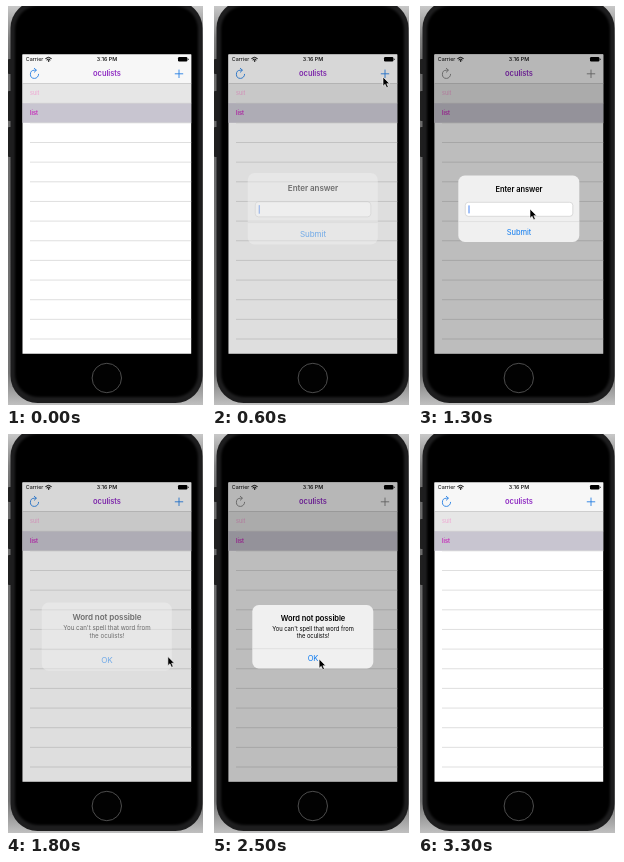
An HTML page that plays this animation: 200 px wide and 400 px high, repeating every 3.4 s.

```html
<!DOCTYPE html>
<html lang="en">
<head>
<meta charset="utf-8">
<title>Word game</title>
<style>
  html, body { margin: 0; width: 100%; height: 100%; overflow: hidden; background: #fff; }
  svg { display: block; width: 200px; height: 400px; }
  text { font-family: Inter, "Liberation Sans", sans-serif; letter-spacing: -.06px; }
  .mid { text-anchor: middle; }
  .title { font-size: 7.5px; font-weight: 600; }
  .action { font-size: 7.5px; fill: #0878f0; }
  .note { font-size: 5.8px; letter-spacing: -.02px; }
  .status { font-size: 5.4px; letter-spacing: 0; }
  .word { font-size: 5.5px; letter-spacing: 0; }
  .line { fill: none; stroke-linecap: round; stroke-linejoin: round; }
  .alert { transform-origin: 101px 203px; }
</style>
</head>
<body>
<svg viewBox="0 0 200 400">
  <defs>
    <linearGradient id="metal" x2="0" y2="1">
      <stop offset="0" stop-color="#c8c8c8"/>
      <stop offset=".08" stop-color="#808080"/>
      <stop offset=".15" stop-color="#686868"/>
      <stop offset=".92" stop-color="#747474"/>
      <stop offset="1" stop-color="#c0c0c0"/>
    </linearGradient>
    <filter id="soft"><feGaussianBlur stdDeviation="1"/></filter>
    <clipPath id="view"><rect x="16.5" y="48.5" width="168.7" height="299.2"/></clipPath>
  </defs>

  <rect x="2" width="195" height="399" fill="url(#metal)"/>
  <g fill="#202020">
    <rect x="2" y="53" width="4" height="15" rx="1"/>
    <rect x="2" y="85" width="4" height="30" rx="1"/>
    <rect x="2" y="121" width="4" height="30" rx="1"/>
  </g>
  <rect x="4.5" y="-5" width="192" height="402" rx="27" fill="#1d1d1e"/>
  <rect x="9" y="0" width="183" height="391" rx="23" filter="url(#soft)"/>
  <circle cx="100.8" cy="372" r="14.7" fill="#020202" stroke="#606060" stroke-width=".8"/>

  <g clip-path="url(#view)">
    <rect x="16" y="48" width="170" height="300" fill="#fff"/>
    <rect x="16" y="48" width="170" height="29.5" fill="#f7f7f7"/>
    <rect x="16" y="77.5" width="170" height="19.6" fill="#e6e6e6"/>
    <rect x="16" y="97.1" width="170" height="19.7" fill="#c8c5d0"/>
    <path d="M16 77.5H186" stroke="#b8b8b8" stroke-width=".6"/>
    <path id="rules" stroke="#d2d2d2" stroke-width=".7"/>

    <text class="status" x="19.7" y="55.4">Carrier</text>
    <g class="line" stroke="#000">
      <path d="M39.7 52.4Q42.5 50 45.3 52.4M40.9 53.8Q42.5 52.5 44.1 53.8"/>
      <circle cx="42.5" cy="55" r=".25"/>
    </g>
    <text class="status mid" x="101" y="55.4" font-weight="500">3:16 PM</text>
    <rect x="172" y="51" width="9.4" height="4.5" rx="1.2"/>
    <rect x="181.8" y="52.5" width=".8" height="1.6" rx=".4"/>

    <g id="tools" class="line" stroke="#2880e4" stroke-width=".9">
      <path d="M32.6 68.3A4.1 4.1 0 1 1 28.5 64.2H30M28.3 62.3L30.4 64.2L28.3 66.2"/>
      <path d="M169.2 67.8H176.8M173 64V71.6"/>
    </g>
    <text class="title mid" x="101" y="70.4" fill="#9130c4">oculists</text>
    <text class="word" x="24" y="89.3" fill="#efa4d2">suit</text>
    <text class="word" x="24" y="108.9" fill="#c426b8" font-weight="600">list</text>

    <rect id="dim" x="16" y="48" width="170" height="300"/>

    <g id="ask" class="alert">
      <rect x="40.3" y="169.5" width="121" height="66.5" rx="6.5" fill="#f0f0f0"/>
      <text class="title mid" x="101" y="185.8">Enter answer</text>
      <rect x="47.3" y="196.3" width="107.5" height="14" rx="3" fill="#fff" stroke="#c6c6c6" stroke-width=".6"/>
      <path d="M51 199.4V207.4" stroke="#3478f0" stroke-width=".9"/>
      <path d="M40.3 215.6H161.3" stroke="#d0d0d0" stroke-width=".5"/>
      <text class="action mid" x="101" y="228.6">Submit</text>
    </g>

    <g id="warn" class="alert">
      <rect x="40.3" y="171" width="121" height="63.5" rx="6.5" fill="#f0f0f0"/>
      <text class="title mid" x="101" y="187.3">Word not possible</text>
      <text class="note mid" x="101" y="196.5">You can't spell that word from</text>
      <text class="note mid" x="101" y="203.6">the oculists!</text>
      <path d="M40.3 214.7H161.3" stroke="#d0d0d0" stroke-width=".5"/>
      <text class="action mid" x="101" y="227.4">OK</text>
    </g>
  </g>

  <path id="pointer" d="M0 0V9.2L2.1 7.3L3.7 10.8L5.3 10L3.8 6.7H6.6Z" stroke="#fff" stroke-width=".6"/>
</svg>
<script>
  const LOOP = 3400, STEP = 100, FADE = 200;
  const $ = id => document.getElementById(id);
  const ramp = (t, start, length) => Math.min(1, Math.max(0, (t - start) / length));

  const entry = { x: 150, y: 400 };
  const moves = [
    { at: 100, length: 400, x: 171, y: 71 },      // add button
    { at: 600, length: 250, x: 112, y: 203 },     // answer field
    { at: 1300, length: 200, x: 103, y: 224 },    // submit
    { at: 1700, length: 200, x: 174.5, y: 221 },  // aside
    { at: 2300, length: 300, x: 102.5, y: 227 },  // OK
    { at: 2800, length: 200, x: 140, y: 401 }     // away
  ];

  // Sideways motion settles early while vertical motion stays even.
  function pointerAt(t) {
    return moves.reduce((p, m) => {
      const k = ramp(t, m.at, m.length);
      return {
        x: p.x + (m.x - p.x) * (1 - (1 - k) ** 2.5),
        y: p.y + (m.y - p.y) * k
      };
    }, entry);
  }

  function showAlert(id, t, opens, closes) {
    const entered = ramp(t, opens, FADE);
    const shown = entered - ramp(t, closes, FADE);
    $(id).style.opacity = shown;
    $(id).style.transform = `scale(${1 + .15 * (1 - entered)})`;
    return shown;
  }

  function draw(t) {
    const { x, y } = pointerAt(t);
    $("pointer").setAttribute("transform", `translate(${x} ${y})`);
    $("pointer").style.visibility = t > 100 && t < 3000 ? "visible" : "hidden";

    const shade = showAlert("ask", t, 500, 1600) + showAlert("warn", t, 1700, 2700);
    $("dim").style.opacity = .26 * Math.min(1, shade);
    $("tools").style.stroke = shade > .6 ? "#858585" : "";
  }

  $("rules").setAttribute("d", Array.from({ length: 13 }, (_, i) => `M24 ${97.2 + i * 19.65}H186`).join(""));

  const start = performance.now();
  function tick() {
    const t = (performance.now() - start) % LOOP;
    draw(Math.floor(t / STEP) * STEP);
    requestAnimationFrame(tick);
  }
  tick();
</script>
</body>
</html>
```
